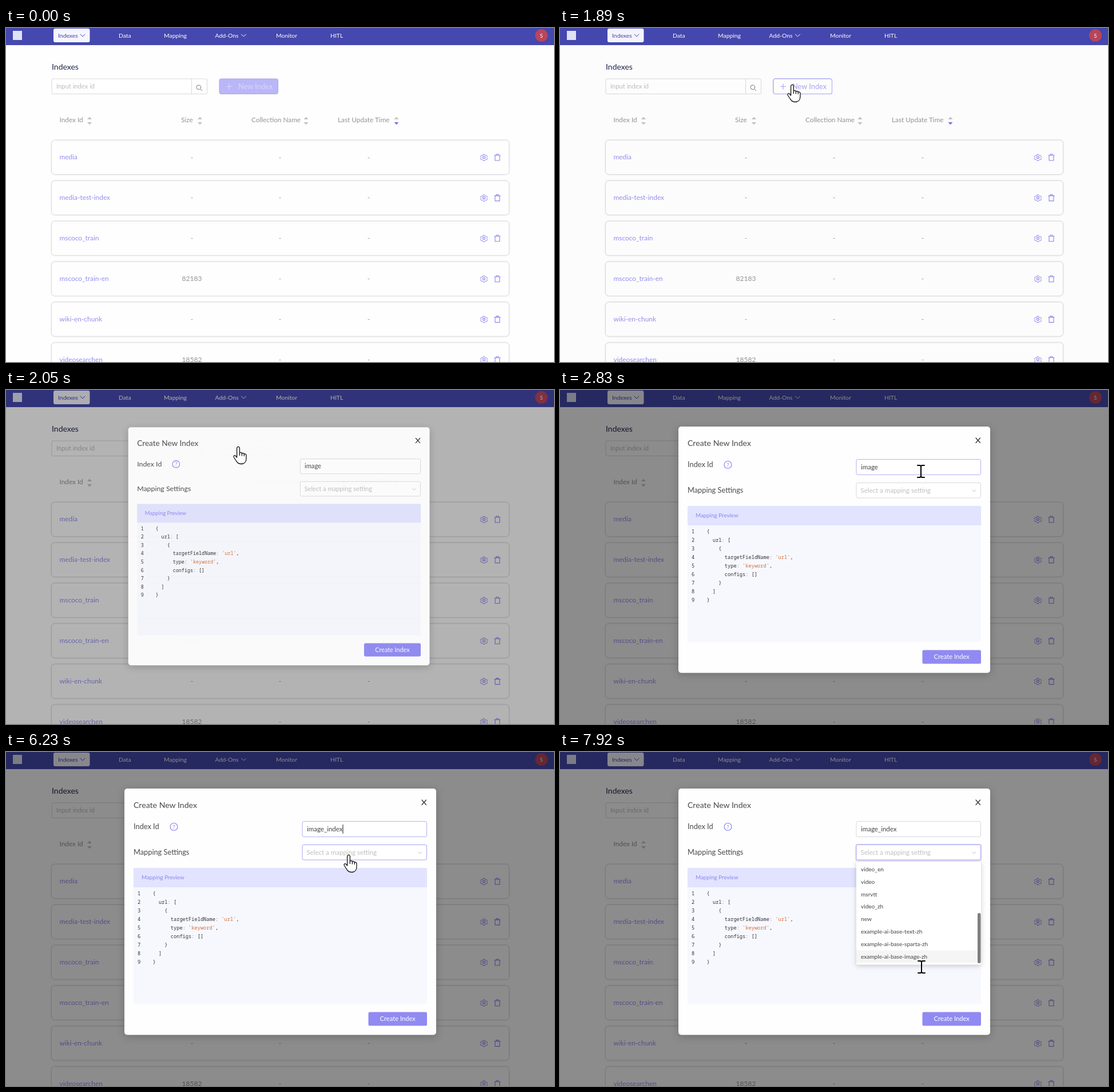
An HTML page that plays this animation: 958 by 585 pixels, repeating every 7.99 s.

```html
<!DOCTYPE html>
<html lang="en">
<head>
<meta charset="utf-8">
<title>Create an index</title>
<style>
  html, body { margin: 0; width: 100%; height: 100%; overflow: hidden; background: #fefefe; }
  svg { display: block; width: 958px; height: 585px; }
  text { font-family: Lato, "Open Sans", sans-serif; white-space: pre; }
  .code text { font: 8.7px "Noto Sans Mono", "DejaVu Sans Mono", monospace; }
  .line { fill: none; stroke-linecap: round; stroke-linejoin: round; }
  .card { fill: #fefefe; stroke: #dcdcdf; filter: drop-shadow(0 0 1px rgba(0, 0, 0, .12)); }
  .panel { filter: drop-shadow(0 3px 7px rgba(0, 0, 0, .2)); }
  .list { filter: drop-shadow(0 2px 4px rgba(0, 0, 0, .2)); }
</style>
</head>
<body>
<svg id="stage" viewBox="0 0 958 585">
  <defs>
    <clipPath id="view"><rect x="518" y="194.5" width="218" height="175"/></clipPath>
    <g id="gear" class="line" stroke="#8883ee" stroke-width="1.1">
      <path d="M-1.6-5.8h3.2l.5 1.7 1.5.9 1.8-.5 1.6 2.6-1.4 1.3v1.1L7 2.4 5.4 5 3.6 4.4l-1.5.9-.5 1.4h-3.2l-.5-1.5-1.5-.9L-5.4 5-7 2.4l1.4-1.2V.1L-7-1.1-5.4-3.7l1.8.5 1.5-.9z" transform="scale(.88)"/>
      <circle r="2"/>
    </g>
    <path id="trash" class="line" stroke="#8883ee" stroke-width="1.1"
      d="M-5-3.5H5M-2-3.5V-5.5H2V-3.5M-4-3.5V5.5H4V-3.5"/>
    <g id="arrow"><path d="M0 0V17l4-3.7 2.6 6.2 3-1.3-2.6-6h5.4z" fill="#fff" stroke="#000"/></g>
    <g id="hand" fill="#fff" stroke="#111" stroke-width="1.3" stroke-linejoin="round">
      <path d="M-2.4 19V2.8a2.4 2.4 0 0 1 4.8 0V11q2-1.8 4 .9 2.2-1.2 3.9 1 3-.6 3.7 2.2V21C14 27 10.500 30.500 5 30.500-.5 30.500-2 27.500-4 24.500L-7.600 19C-9 16.500-6.500 14.500-4.500 16.500z"/>
      <path d="M2.400 11v5M6.400 12v4.500M10.300 13v4" fill="none"/>
    </g>
    <path id="beam" class="line" stroke="#000" stroke-width="2"
      d="M-6-10.500H-2L0-9.500 2-10.500H6M0-9.500V9.500M-6 10.500H-2L0 9.500 2 10.500H6"/>
  </defs>
</svg>
<script>
const LOOP = 7990, ROW = 21.83;
const stage = document.getElementById('stage');
const $ = id => document.getElementById(id);
const text = (x, y, size, fill, str, extra = '') =>
  `<text x="${x}" y="${y}" font-size="${size}" fill="${fill}" ${extra}>${str}</text>`;
const rect = (x, y, w, h, fill, extra = '') =>
  `<rect x="${x}" y="${y}" width="${w}" height="${h}" fill="${fill}" ${extra}/>`;
const chevron = (x, y, r, color) =>
  `<path class="line" stroke="${color}" d="M${x - r} ${y - r / 2}l${r} ${r} ${r} ${-r}"/>`;
const middle = 'text-anchor="middle"';

// Page
const nav = [[197, 'Data'], [276, 'Mapping'], [365.500, 'Add-Ons'], [472, 'Monitor'], [567, 'HITL']];
const columns = [[93.500, 'Index Id', 146], [306, 'Size', 339], [429, 'Collection Name', 524.500], [580, 'Last Update Time', 682.500]];
const rows = [['media'], ['media-test-index'], ['mscoco_train'], ['mscoco_train-en', '82183'], ['wiki-en-chunk'], ['videosearchen', '18582']];

const sorter = (x, down) =>
  `<path d="M${x - 4} 160l4-4.500 4 4.500z" fill="#c4c4c4"/><path d="M${x - 4} 165l4 4.500 4-4.500z" fill="${down}"/>`;

const row = ([name, size = '-'], i) => {
  const y = 226.500 + i * 70.900;
  return `<rect class="card" x="79.500" y="${y - 30}" width="800" height="60" rx="6"/>` +
    text(93.500, y + 3.500, 11.9, '#938ef2', name) +
    [[325, size], [479, '-'], [634, '-']].map(([x, s]) => text(x, y + 4, 12, '#949494', s, middle)).join('') +
    `<use href="#gear" x="835.500" y="${y}"/><use href="#trash" x="859" y="${y}"/>`;
};

const newButton = (id, fill, stroke, ink) => `<g id="${id}">` +
  rect(373, 89, 102.500, 26.500, fill, `rx="3" stroke="${stroke}"`) +
  `<path class="line" stroke="${ink}" stroke-width="1.2" d="M385.500 102.500h9M390 98v9"/>` +
  text(406, 106.500, 12.8, ink, 'New Index') + '</g>';

const page = rect(0, 0, 958, 585, '#fefefe') + rect(0, 0, 958, 30, '#4548ae') +
  rect(12, 5, 16, 16, '#e0e3f4') +
  rect(83, 1, 63.500, 24, '#f6f6fd', 'rx="3"') +
  text(91, 16.500, 10.4, '#4548ae', 'Indexes') + chevron(134, 13, 4, '#4548ae') +
  nav.map(([x, s]) => text(x, 16.500, 10.4, '#fff', s)).join('') + chevron(415.500, 13, 4, '#fff') +
  '<circle cx="936" cy="13" r="11" fill="#b8465c"/>' + text(936, 16.500, 9, '#fff', 'S', middle) +
  text(80, 72.500, 14, '#24264f', 'Indexes') +
  rect(80, 89, 271.500, 26.500, '#fff', 'rx="2" stroke="#d9d9d9"') +
  '<path d="M324.500 89v26.500" stroke="#d9d9d9"/>' +
  text(88, 106, 11.2, '#bdbdbd', 'Input index id') +
  '<g class="line" stroke="#777"><circle cx="336.800" cy="103.800" r="3.800"/><path d="M339.600 106.600l3.200 3.200"/></g>' +
  newButton('pale', '#bab6f8', '#a9a5f0', '#d9d7fc') +
  newButton('full', '#9e98f5', '#9e98f5', '#fff') +
  newButton('pressed', '#fff', '#a9a4f3', '#a9a4f3') +
  columns.map(([x, s, ax], i) => text(x, 165, 11.8, '#949494', s) + sorter(ax, i == 3 ? '#7d77ea' : '#c4c4c4')).join('') +
  rows.map(row).join('');

// Dialog
const code = ['{', '  url: [', '    {', "      targetFieldName: 'url',", "      type: 'keyword',", '      configs: []', '    }', '  ]', '}'];
const paint = s => s.replace(/'\w+'/, '<tspan fill="#d4703f">$&</tspan>').replace(/:/, '<tspan fill="#8a8a92">:</tspan>');
const codeLine = (s, i) => {
  const y = 251 + i * 15.030;
  return text(232.500, y, 8.7, '#333', i + 1, middle) + text(256.500, y, 8.7, '#333', paint(s));
};

const options = ['image_en', 'image', 'image_zh', 'video_en', 'video', 'msrvtt', 'video_zh', 'new',
  'example-ai-base-text-zh', 'example-ai-base-sparta-zh', 'example-ai-base-image-zh'];

const dialog = '<g id="dialog">' +
  rect(207, 64, 545, 431.500, '#fefefe', 'rx="5" class="panel"') +
  text(223, 98, 14.1, '#4a4a4f', 'Create New Index') +
  '<path class="line" stroke="#333" stroke-width="1.3" d="M727 84l7.500 8.500M734.500 84l-7.500 8.500"/>' +
  text(223, 135, 12.8, '#4a4a4f', 'Index Id') +
  '<circle cx="293.500" cy="131" r="6.500" fill="none" stroke="#8883ee" stroke-width="1.200"/>' +
  text(293.500, 134.500, 9.5, '#8883ee', '?', middle) +
  text(223, 180, 12.8, '#4a4a4f', 'Mapping Settings') +
  rect(518, 121.500, 217.500, 27, '#fff', 'id="field" rx="2.500"') +
  '<text id="value" x="526" y="138.500" font-size="11.500" fill="#444"></text>' +
  rect(0, 127, 1, 16, '#222', 'id="caret"') +
  rect(517, 161.500, 219.500, 29, 'none', 'id="glow" rx="3" stroke="#d9d6fc" stroke-width="1.500"') +
  rect(518, 162.500, 217.500, 26.500, '#fff', 'id="select" rx="2.500"') +
  text(525.500, 179.500, 11.5, '#bfbfbf', 'Select a mapping setting') + chevron(724, 176.500, 3, '#c4c4c4') +
  rect(223, 203, 513, 34.500, '#e2e3fe') + rect(223, 237, 513, 204, '#f7f8fe') +
  text(237, 223, 9.8, '#8c87ef', 'Mapping Preview') +
  '<g class="code">' + code.map(codeLine).join('') + '</g>' +
  rect(633.500, 455.500, 102.500, 24, '#908af2', 'rx="2.500"') +
  text(684.700, 471.300, 11.2, '#fff', 'Create Index', middle) +
  '<g id="list">' + rect(518, 192.500, 218, 180, '#fff', 'rx="2" class="list"') +
  '<g clip-path="url(#view)"><g id="options">' + rect(518, 0, 218, ROW, '#f5f5f5', 'id="active"') +
  options.map((s, i) => text(526, 209 + i * ROW, 10.1, '#444', s)).join('') + '</g></g>' +
  rect(730, 194, 5.500, 88, '#7f7f7f', 'id="thumb" rx="2.700"') + '</g></g>';

stage.insertAdjacentHTML('beforeend', page + rect(0, 0, 958, 585, '#000', 'id="mask"') + dialog + '<use id="cursor"/>');

// Runs of screen updates: first, last, count
const runs = [[0, 0, 1], [70, 330, 5], [520, 590, 2], [850, 1410, 9], [1490, 1640, 3], [1710, 1890, 3], [1970, 2050, 2],
  [2110, 2250, 3], [2630, 2830, 3], [3040, 3170, 2], [3570, 3570, 1], [4110, 4240, 2], [4510, 4510, 1], [4690, 4900, 3],
  [5100, 5100, 1], [5630, 5630, 1], [5960, 6230, 4], [6440, 7180, 11], [7250, 7250, 1], [7640, 7920, 5]];
const ticks = runs.flatMap(([a, b, n]) => Array.from({ length: n }, (_, i) => a + (n > 1 ? (b - a) * i / (n - 1) : 0)));

const moves = [[520, 590, 942, 573, 936, 571], [780, 1410, 936, 571, 386, 113], [1410, 1640, 386, 113, 406, 99],
  [2560, 2830, 406, 99, 631, 142.500], [2970, 3170, 631, 142.500, 643, 149.500], [5870, 6230, 643, 149.500, 599, 180],
  [6580, 6880, 599, 180, 630, 247], [7570, 7920, 630, 247, 632, 376.500]];
const shapes = [[0, 'arrow'], [1405, 'hand'], [2630, 'arrow'], [2730, 'beam'], [6050, 'hand'], [7900, 'beam']];
const typing = [[0, 5], [4240, 6], [4510, 7], [4690, 8], [4790, 9], [4900, 10], [5100, 11]];

const ramp = (t, a, b) => Math.min(1, Math.max(0, (t - a) / (b - a)));
const smooth = u => u * u * (3 - 2 * u);
const last = (list, t, key) => list.filter(e => key(e) <= t + .01).pop();
const set = (id, attrs) => { for (const k in attrs) $(id).setAttribute(k, attrs[k]); };
const show = (id, on) => set(id, { opacity: +on });

function draw(now) {
  const t = last(ticks, now % LOOP, e => e);

  show('full', ramp(t, 0, 330));
  show('pressed', ramp(t, 1640, 1890));
  show('mask', .45 * ramp(t, 1885, 2135));

  // The dialog grows out of the click point.
  const open = 1 - (1 - ramp(t, 1890, 2240)) ** 5.2;
  set('dialog', { opacity: open, transform: `translate(408 98) scale(${.2 + .8 * open}) translate(-408 -98)` });

  const [a, b, x0, y0, x1, y1] = last(moves, t, m => m[0]) || moves[0];
  const u = smooth(ramp(t, a, b));
  const x = x0 + (x1 - x0) * u, y = y0 + (y1 - y0) * u;
  set('cursor', { href: '#' + last(shapes, t, s => s[0])[1], transform: `translate(${x} ${y})` });
  show('cursor', t >= 520);

  const picked = t >= 6440;
  $('value').textContent = 'image_index'.slice(0, last(typing, t, k => k[0])[1]);
  set('caret', { x: 526 + $('value').getComputedTextLength() });
  show('caret', t >= 3040 && t < 3570 || t >= 4110 && t < 5630 || t >= 6140 && !picked);
  set('field', { stroke: t >= 2830 && !picked ? '#b5b1f4' : '#d9d9d9' });
  set('select', { stroke: t >= 6140 ? '#a9a5f3' : '#d9d9d9' });
  show('glow', picked);

  const drop = 1 - (1 - ramp(t, 6370, 6620)) ** 3;
  const scroll = smooth(ramp(t, 6880, 7180));
  const offset = scroll * 3 * ROW;
  const slot = Math.min(7, Math.max(0, Math.round((y - 205.500) / ROW)));
  set('list', { opacity: drop, transform: `translate(0 192.500) scale(1 ${.8 + .2 * drop}) translate(0 -192.500)` });
  set('options', { transform: `translate(0 ${-offset})` });
  set('active', { y: 194.600 + (slot + Math.round(offset / ROW)) * ROW });
  set('thumb', { y: 194 + 88 * scroll });
  show('thumb', scroll > 0);
}

function loop() {
  draw(performance.now());
  requestAnimationFrame(loop);
}
draw(0);
requestAnimationFrame(loop);
</script>
</body>
</html>
```
